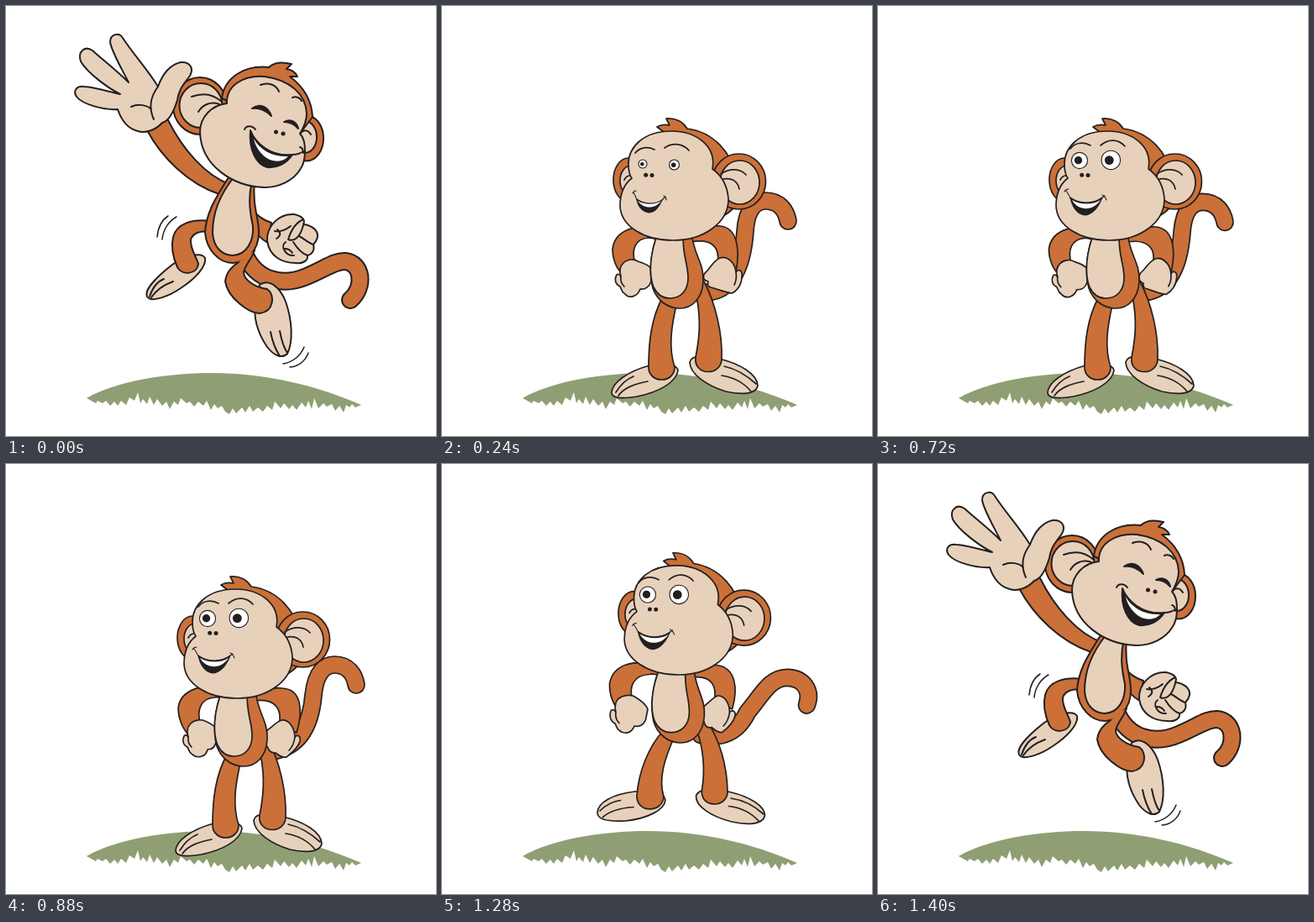
An HTML page with a canvas that plays this animation: 512x512 px, repeating every 2880 ms.

```html
<!DOCTYPE html>
<html lang="en">
<head>
<meta charset="utf-8">
<title>Jumping monkey</title>
<style>
html, body { margin: 0; width: 100%; height: 100%; overflow: hidden; background: #fff; }
canvas { display: block; width: 512px; height: 512px; }
</style>
</head>
<body>
<canvas id="stage" width="512" height="512"></canvas>
<script>
const ctx = document.getElementById('stage').getContext('2d');
const LOOP = 2880, STEP = 40;
const FUR = '#cb7038', SKIN = '#e8d1bb', INK = '#231f20', GRASS = '#8f9f73', WHITE = '#fff';
let lineWidth = 1.7;

const clamp = (v, lo, hi) => Math.min(hi, Math.max(lo, v));

// Blends two path strings that share the same commands.
function mix(a, b, p) {
  const to = b.match(/-?[\d.]+/g);
  let i = 0;
  return a.replace(/-?[\d.]+/g, n => (+n + (to[i++] - n) * p).toFixed(2));
}

// Picks a pose from a list of key poses; s = 1.5 lies between keys 1 and 2.
function pose(keys, s) {
  const i = Math.min(Math.floor(s), keys.length - 2);
  return mix(keys[i], keys[i + 1], s - i);
}

function shape(d, fill, stroke = INK) {
  const path = new Path2D(d);
  if (fill) { ctx.fillStyle = fill; ctx.fill(path); }
  if (stroke) { ctx.strokeStyle = stroke; ctx.lineWidth = lineWidth; ctx.stroke(path); }
}

const line = d => shape(d, null);

function oval(x, y, rx, ry, fill, outlined = true) {
  ctx.beginPath();
  ctx.ellipse(x, y, rx, ry, 0, 0, Math.PI * 2);
  ctx.fillStyle = fill;
  ctx.fill();
  if (outlined) { ctx.strokeStyle = INK; ctx.lineWidth = lineWidth; ctx.stroke(); }
}

function tube(d, width) {
  const path = new Path2D(d);
  ctx.strokeStyle = INK; ctx.lineWidth = width + lineWidth; ctx.stroke(path);
  ctx.strokeStyle = FUR; ctx.lineWidth = width - lineWidth; ctx.stroke(path);
}

function moved(x, y, angle, dx, dy, draw) {
  ctx.save();
  ctx.translate(x + dx, y + dy);
  ctx.rotate(angle);
  ctx.translate(-x, -y);
  draw();
  ctx.restore();
}

function drawGrass() {
  shape('M96 467 C130 447 190 437 245 437 C310 437 370 452 423 475 ' +
    'L416 478 L412 474 L409 478 L405 475 L402 484 L397 476 L392 482 L388 474 L382 477 L378 473 ' +
    'L372 479 L367 467 L364 480 L360 470 L357 478 L352 472 L346 481 L341 475 L337 480 L331 473 ' +
    'L327 479 L320 471 L317 481 L311 476 L306 483 L300 478 L294 483 L290 476 L285 484 L281 478 ' +
    'L274 485 L270 479 L266 486 L261 483 L257 476 L252 479 L248 474 L244 481 L239 470 L235 476 ' +
    'L229 471 L224 477 L219 471 L215 473 L208 467 L205 475 L200 471 L195 480 L191 471 L186 476 ' +
    'L180 468 L176 475 L171 465 L168 474 L163 468 L160 473 L157 460 L153 470 L147 466 L143 475 ' +
    'L137 470 L133 476 L129 471 L124 476 L119 470 L115 473 L109 470 L107 473 Z', GRASS, null);
}

// Resting, crouched, lifting off, in the air.
const TAIL = [
  'M316 341 C345 338 358 310 361 268 C363 240 374 232 385 232 C403 232 410 245 412 256',
  'M318 342 C350 336 363 310 366 275 C369 247 380 239 391 239 C408 239 415 251 417 263',
  'M316 335 C347 334 365 316 373 281 C379 253 391 245 404 245 C423 245 434 258 430 274',
  'M292 297 C306 317 328 324 346 323 C384 321 388 273 425 273 C446 274 454 294 443 313'
];
const LEFT_ARM = [
  'M258 266 C225 258 205 270 203 290 C203 300 207 312 214 318 L230 306 C225 290 230 277 246 276 C252 276 256 278 262 280',
  'M258 268 C228 260 207 272 205 291 C205 302 210 315 217 322 L232 310 C226 294 232 279 248 278 C252 277 256 278 262 280',
  'M268 212 C225 202 200 206 194 232 C193 240 195 250 199 260 L221 250 C219 234 225 224 245 223 C252 222 258 223 268 227'
];
const LEFT_HAND = [
  'M216 306 C221 301 229 301 233 304 C240 306 247 309 249 313 L249 328 C247 334 242 338 236 337 C233 346 223 349 218 343 C213 340 214 337 212 334 C206 331 205 325 208 320 C210 318 212 321 213 322 C211 316 212 310 216 306Z',
  'M220 309 C225 304 233 304 237 306 C244 309 249 312 250 316 L250 331 C249 337 246 340 240 340 C238 349 228 351 222 346 C217 343 218 340 216 337 C210 334 210 328 212 324 C214 321 216 324 217 325 C215 319 216 313 220 309Z',
  'M200 250 C205 246 214 245 220 247 C230 254 238 262 240 268 L235 278 C231 285 223 287 218 284 C214 292 206 294 201 289 C197 286 198 283 196 281 C190 278 188 270 190 264 C193 261 196 264 197 266 C196 260 196 254 200 250Z'
];
const LEFT_FINGER = [
  'M213 322 C212 328 214 331 217 334',
  'M217 325 C216 331 218 334 221 337',
  'M197 266 C196 272 198 277 201 280'
];
const RIGHT_ARM = [
  'M292 283 C300 268 318 261 331 262 C352 264 355 290 350 316 L328 306 C331 290 324 276 296 281',
  'M292 283 C300 272 318 265 329 267 C352 268 354 294 346 320 L325 310 C329 294 322 278 296 282',
  'M296 226 C304 214 314 211 325 212 C347 216 352 240 345 264 L323 254 C327 236 320 224 300 226'
];
const RIGHT_HAND = [
  'M331 300 C339 297 349 305 350 317 C353 312 358 315 357 322 C357 331 352 339 345 342 C337 341 328 337 320 335 C316 334 316 331 317 328 C311 327 310 322 313 318 C319 313 323 303 331 300Z',
  'M328 305 C336 304 343 312 344 325 C348 321 351 325 350 330 C348 338 340 344 334 349 C330 350 326 348 321 344 C316 344 313 342 312 338 C308 334 308 324 311 317 C317 313 322 307 328 305Z',
  'M328 247 C336 247 341 255 341 266 C346 262 349 266 348 270 C346 279 339 286 333 290 C329 290 325 287 321 283 C317 285 314 283 313 279 C311 274 310 264 313 260 C318 256 322 250 328 247Z'
];
const RIGHT_FINGER = [
  'M350 317 C351 323 350 328 348 332',
  'M344 325 C343 332 341 337 337 341',
  'M341 266 C340 274 337 279 333 283'
];
const LEFT_FOOT = [
  'M202 461 C202 448 222 435 247 428 C262 424 279 425 281 434 C279 448 258 460 232 465 C214 468 203 467 202 461Z',
  'M168 370 C168 358 185 351 212 352 C235 352 249 356 251 366 C251 376 232 384 205 385 C183 384 168 380 168 370Z'
];
const LEFT_TOES = [
  'M207 460 C212 452 218 445 228 441 M210 464 C217 454 230 450 245 447',
  'M169 366 C177 361 186 359 197 360 M173 377 C184 371 197 369 211 370'
];
const RIGHT_FOOT = [
  'M295 424 C297 415 312 416 330 420 C355 426 375 438 376 452 C374 463 355 463 338 459 C315 452 295 438 295 424Z',
  'M310 366 C314 356 335 357 355 361 C378 366 393 376 393 385 C390 397 370 397 352 393 C328 388 308 378 310 366Z'
];
const RIGHT_TOES = [
  'M336 429 C350 432 363 440 374 450 M333 440 C346 442 359 448 368 459',
  'M352 367 C366 368 381 374 392 384 M350 375 C363 376 377 382 387 392'
];
const LEFT_LEG = [
  'M263 346 C249 372 246 400 246 430 C246 450 277 450 277 430 C270 408 272 385 280 352',
  'M265 288 C242 301 222 335 218 360 C217 382 248 382 251 362 C245 343 257 319 274 296'
];
const RIGHT_LEG = [
  'M303 346 C309 375 306 398 302 418 C299 441 333 441 333 420 C334 390 326 355 312 328',
  'M304 288 C316 312 320 335 317 358 C315 380 347 379 347 360 C345 330 336 300 314 276'
];
const BROWS = [
  'M230 175 C236 168 245 167 253 171 M265 169 C275 162 287 164 294 172',
  'M229 170 C234 163 244 161 253 166 M265 166 C275 157 287 159 294 167'
];
const MOUTH = [
  'M232 230 C241 236 253 237 262 231 C258 240 253 246 246 246 C239 245 233 239 232 230Z',
  'M229 228 C240 236 256 236 267 228 C262 241 254 249 246 249 C238 248 231 240 229 228Z'
];
const TEETH = [
  'M233 232 C242 237 253 237 261 232 C254 242 240 242 233 232Z',
  'M231 231 C241 237 256 237 265 231 C257 244 239 245 231 231Z'
];
const DIMPLES = [
  'M227 223 C228 221 230 220 231 220 M228 222 C230 225 231 228 232 231 M261 232 C263 230 264 229 266 227 M264 226 C266 227 267 229 267 231',
  'M222 221 C223 219 225 218 227 218 M224 220 C226 223 228 226 229 229 M266 229 C267 228 269 227 270 226 M267 225 C270 226 271 228 272 231'
];

function drawTorso() {
  shape('M258 268 C248 292 246 318 251 336 C256 350 268 360 283 360 C298 360 310 348 311 328 C312 305 300 298 297 270Z', FUR);
  shape('M258 268 C247 295 246 320 252 335 C257 345 264 348 271 348 C285 348 293 338 293 324 C293 305 286 300 287 268Z', SKIN);
}

function drawEye(k, from, to) {
  const [x, y, r, px, py, pr] = from.map((v, i) => v + (to[i] - v) * k);
  oval(x, y, r, r, WHITE);
  oval(px, py, pr, pr, INK, false);
}

function drawSkull() {
  oval(222, 207, 18, 26, FUR);
  oval(225, 208, 13, 18, SKIN);
  line('M217 207 C219 203 221 202 224 202');
  shape('M250 156 L264 150 L256 144 C261 141 266 141 271 142 L267 134 C278 133 287 138 292 146 ' +
    'C323 150 345 174 351 205 L352 234 C346 244 338 249 322 257Z', FUR);
  oval(353.5, 209, 32, 33, FUR);
  oval(354.5, 210, 23.5, 26, SKIN);
  line('M332 200 C342 193 355 193 362 201 M332 207 C344 203 352 208 354 218');
  shape('M322 194 C327 167 303 149 273 149 C240 149 222 168 222 188 C222 196 223 201 226 205 ' +
    'C217 212 212 222 212 238 C213 262 240 279 275 279 C312 279 341 258 341 230 C340 214 333 202 322 194Z', SKIN);
}

function drawFace(k) {
  line(mix(...BROWS, k));
  lineWidth = 1.1;
  drawEye(k, [239, 188, 5, 238.3, 188.3, 2.3], [240, 184, 9.6, 238.5, 183.7, 4.7]);
  drawEye(k, [276.5, 189, 6, 275.7, 189.3, 2.8], [277.3, 183.4, 11.2, 275.3, 183.6, 5.4]);
  oval(242.7, 201.3, 2.5, 2.5, INK, false);
  oval(250, 201.5, 2.5, 2.5, INK, false);
  shape(mix(...MOUTH, k), INK);
  shape(mix(...TEETH, k), WHITE, null);
  line(mix(...DIMPLES, k));
}

// s: 0 resting, 1 crouched, 2 in the air; k: how wide the eyes are
function drawStanding(s, k) {
  lineWidth = 1.7;
  const air = Math.max(0, s - 1);
  const lift = 0.25;
  const swing = Math.min(s, 1) + Math.min(air / lift, 1) + Math.max(0, air - lift) / (1 - lift);
  tube(pose(TAIL, swing), 20);
  shape(mix(...LEFT_FOOT, air), SKIN);
  line(mix(...LEFT_TOES, air));
  shape(mix(...RIGHT_FOOT, air), SKIN);
  line(mix(...RIGHT_TOES, air));
  shape(mix(...LEFT_LEG, air), FUR);
  shape(mix(...RIGHT_LEG, air), FUR);
  shape(pose(LEFT_ARM, s), FUR);
  shape(pose(RIGHT_ARM, s), FUR);
  shape(pose(LEFT_HAND, s), SKIN);
  line(pose(LEFT_FINGER, s));
  shape(pose(RIGHT_HAND, s), SKIN);
  line(pose(RIGHT_FINGER, s));
  moved(283, 360, 0.05 * air, air, -56 * air, drawTorso);
  moved(276, 279, 0.055 * air, 8 * air, -56 * air, drawSkull);
  moved(276, 279, 0.02 * air, 8 * air, -56 * air, () => drawFace(k));
}

function drawLeapBody() {
  tube('M284 295 C298 328 330 334 358 322 C380 313 392 303 404 304 C424 306 428 334 410 350', 20);
  shape('M168 148 C185 180 217 212 254 224 L268 213 C237 202 210 170 193 136', FUR);
  shape('M290 238 C299 250 306 255 316 258 L312 282 C304 278 298 272 294 262', FUR);

  shape('M311 280 C310 262 325 247 343 248 C352 250 357 254 354 260 C364 261 372 267 371 275 C370 280 368 282 366 284 ' +
    'C368 291 364 296 359 297 C360 304 352 307 345 306 C328 306 314 298 311 280Z', SKIN);
  line('M354 254 C345 258 339 268 336 278 C343 281 350 276 354 261 M320 268 C327 269 334 266 339 262 M323 266 C328 270 327 274 322 277 ' +
    'M349 274 C355 277 361 283 366 284 M342 281 C347 289 353 295 359 297 M333 281 C326 286 333 298 343 297 M332 289 C336 289 339 291 341 294');

  shape('M168 346 C164 338 180 322 198 308 C212 298 232 292 237 300 C239 310 225 325 208 336 C195 345 173 354 168 346Z', SKIN);
  line('M171 346 C174 337 180 328 188 325 M173 347 C179 338 188 332 199 328');
  shape('M244 256 C222 253 203 259 199 275 C196 288 200 302 204 311 C210 322 228 319 229 307 C226 297 219 289 220 278 C223 270 230 268 244 268', FUR);

  shape('M265 204 C252 225 238 245 237 270 C239 291 254 306 270 306 C287 306 301 290 301 270 C301 250 293 240 296 208Z', FUR);
  shape('M271 204 C255 225 246 245 246 270 C247 288 258 297 270 297 C287 296 295 280 294 262 C289 240 289 225 293 208Z', SKIN);

  shape('M302 332 C312 325 325 332 333 352 C341 375 342 400 335 414 C328 421 318 415 311 406 C300 390 294 370 297 350Z', SKIN);
  line('M315 388 C317 399 321 409 326 417 M326 387 C328 398 331 407 335 413');
  shape('M277 305 C269 310 262 318 261 328 C264 348 290 366 302 366 C319 364 321 344 311 337 C295 335 283 325 283 317 C285 308 292 302 296 291', FUR);
}

function drawLeapHead() {
  oval(231, 119, 32, 34, FUR);
  oval(232, 118.5, 25.5, 26.5, SKIN);
  line('M221 108 C234 103 247 105 257 114 M229 126 C234 118 243 113 254 117');
  oval(358, 157.5, 20, 27, FUR);
  oval(356, 156, 14, 19, SKIN);
  line('M350 152 C355 146 360 148 363 153');
  shape('M257 110 C260 85 284 70 313 73 C320 66 332 67 340 69 L334 75 C340 76 345 79 347 84 L338 84 C354 96 364 112 365 132 L350 152Z', FUR);
  shape('M263 116 C262 94 284 82 308 84 C338 88 357 105 358 128 C358 139 353 147 350 152 C358 160 358 184 350 195 ' +
    'C342 208 325 216 308 216 C270 215 232 190 231 150 C231 132 245 118 263 116Z', SKIN);
  line('M303 94 C312 90 322 94 325 102 M341 109 C345 107 350 109 352 113');
  shape('M293 122 C302 115 312 120 316 131 C309 124 301 121 293 122Z', INK);
  shape('M331 138 C338 134 346 137 348 146 C343 140 337 138 331 138Z', INK);
  oval(321.5, 150, 2.5, 2.5, INK, false);
  oval(330, 152, 2.5, 2.5, INK, false);
  shape('M291 148 C297 163 315 180 341 177 C334 188 322 193 311 192 C297 188 289 170 291 148Z', INK);
  shape('M295 158 C302 171 317 180 336 179 C331 185 323 186 314 183 C304 178 297 168 295 158Z', WHITE, null);
  line('M284 147 C286 142 293 142 297 147 M341 177 C346 177 350 176 354 173 M350 168 C353 169 354 172 354 175');
}

function drawWavingHand() {
  shape('M133 123 C118 124 92 118 84 108 C79 100 85 95 93 96 C108 97 122 102 136 105 C122 98 97 80 89 66 ' +
    'C85 54 94 47 103 53 C115 64 132 77 146 91 C138 75 126 55 124 43 C124 33 135 31 139 38 C152 58 169 76 181 96 ' +
    'C186 82 195 70 208 67 C219 66 224 74 219 83 C212 93 206 98 204 112 C200 125 194 137 186 139 ' +
    'C178 148 165 152 157 149 C145 146 137 135 133 123Z', SKIN);
  line('M181 96 C172 108 170 122 176 135 M149 120 C158 116 168 118 173 123');
}

function drawLeap() {
  lineWidth = 2;
  drawLeapBody();
  drawLeapHead();
  drawWavingHand();
  lineWidth = 1.5;
  line('M180 275 C181 265 185 255 193 250 M186 278 C187 266 194 256 203 251 ' +
    'M330 426 C342 424 351 416 355 406 M338 430 C350 429 357 421 360 413');
}

function render(time) {
  const t = Math.floor((time % LOOP) / STEP) * STEP;
  ctx.fillStyle = WHITE;
  ctx.fillRect(0, 0, 512, 512);
  ctx.lineCap = ctx.lineJoin = 'round';
  drawGrass();
  if (t < 40 || t >= 1400) {
    drawLeap();
  } else {
    const eyes = clamp((t - 240) / 240, -1 / 6, 1);
    const crouch = clamp((t - 680) / 200, 0, 1);
    const jump = clamp((t - 1200) / 160, 0, 1);
    drawStanding(crouch + jump, eyes);
  }
}

const start = performance.now();
function tick() {
  render(performance.now() - start);
  requestAnimationFrame(tick);
}
tick();
</script>
</body>
</html>
```
